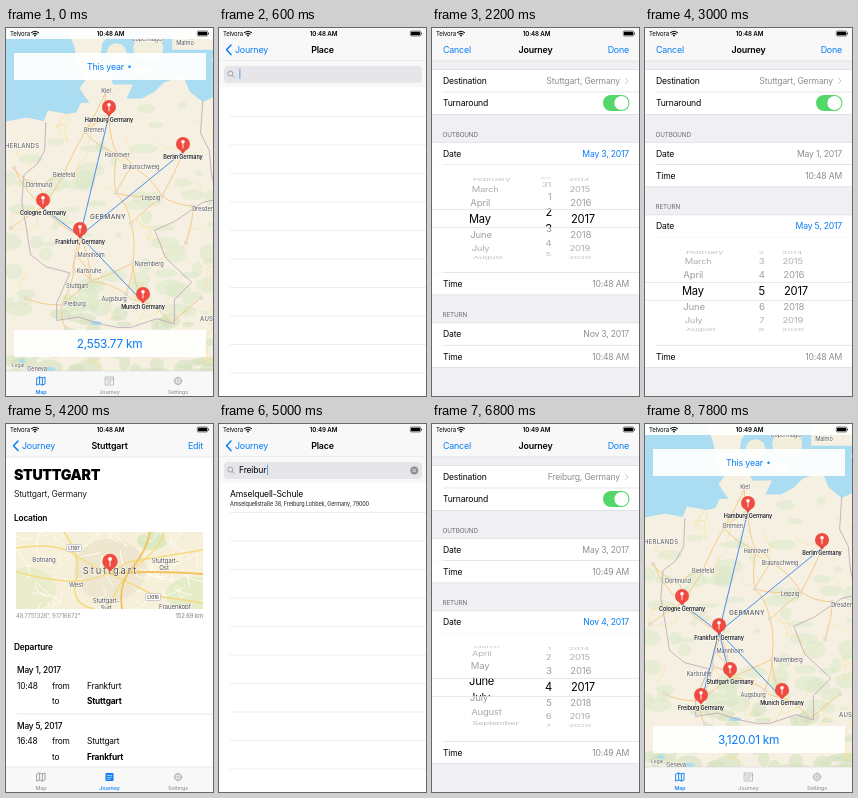
Write an HTML page that moves like this. It is 207 px wide and 368 px high and loops after 8 s.

```html
<!DOCTYPE html>
<html lang="en">
<head>
<meta charset="utf-8">
<title>Journey planner</title>
<style>
html, body { margin: 0; width: 100%; height: 100%; overflow: hidden; background: #fff; }
svg { display: block; width: 100vw; height: 100vh; }
text { font-family: Inter, Roboto, "Liberation Sans", sans-serif; letter-spacing: -.022em; white-space: pre; }
.halo text { paint-order: stroke; stroke: #fffc; stroke-width: 1.2px; stroke-linejoin: round; }
</style>
</head>
<body>
<svg id="stage" viewBox="0 0 207 368">
  <defs>
    <clipPath id="band"><rect y="45" width="207" height="18"/></clipPath>
    <clipPath id="wheel"><path d="M0 4H207V45H0ZM0 63H207V104H0Z"/></clipPath>
    <clipPath id="mini"><rect x="10" y="108" width="187" height="77"/></clipPath>
  </defs>
  <g id="map"></g>
  <g id="screen"></g>
</svg>
<script>
const BLUE = '#087cf5', GREY = '#8e8e93', LINE = '#cfced3', INK = '#000';
const MONTHS = ['January', 'February', 'March', 'April', 'May', 'June', 'July',
  'August', 'September', 'October', 'November', 'December'];
const NOV = 10, MAY = 4;

// ---- drawing helpers ----
const text = (x, y, s, size = 8.6, fill = INK, weight = 400, anchor = 'start', extra = '') =>
  `<text x="${x}" y="${y}" font-size="${size}" fill="${fill}" font-weight="${weight}" text-anchor="${anchor}" ${extra}>${s}</text>`;
const rect = (x, y, w, h, fill, r = 0) =>
  `<rect x="${x}" y="${y}" width="${w}" height="${h}" rx="${r}" fill="${fill}"/>`;
const stroke = (d, color, width = 1, extra = '') =>
  `<path d="${d}" fill="none" stroke="${color}" stroke-width="${width}" stroke-linejoin="round" stroke-linecap="round" ${extra}/>`;
const rule = (y, x = 0, color = LINE) => rect(x, y - .25, 207 - x, .5, color);
const group = (x, y, s, extra = '') => `<g transform="translate(${x} ${y})" ${extra}>${s}</g>`;

function seeded(seed) {
  return () => (seed = (seed * 16807) % 2147483647) / 2147483647;
}

function pin(x, y, scale = 1) {
  return `<g transform="translate(${x} ${y}) scale(${scale})">
    <path d="M-3.4 5.6L0 9.4L3.4 5.6Z" fill="#e8443a"/><circle r="7" fill="#ef4b40"/>
    ${stroke('M0 -1V4', '#fff', .9)}<circle cy="-2.2" r="1.8" fill="#fff"/></g>`;
}

// ---- bars ----
function statusBar(clock) {
  return text(4, 8, 'Telvora', 6) +
    stroke('M25.6 4.6Q29 1.8 32.4 4.6M27 6.1Q29 4.5 31 6.1', INK, 1.1) + '<circle cx="29" cy="7.5" r=".9"/>' +
    text(104.5, 8, clock + ' AM', 6.2, INK, 600, 'middle') +
    '<rect x="191.3" y="3" width="10.4" height="5" rx="1.2" fill="none" stroke="#000" stroke-width=".5"/>' +
    rect(192, 3.7, 9, 3.6, INK, .6) + rect(202.2, 4.6, .8, 1.8, INK, .4);
}

function navBar(clock, title, left, right, back) {
  return rect(0, 0, 207, 33, '#f8f8f8') + rule(33) + statusBar(clock) +
    (back ? stroke('M12 17L7.5 21.8L12 26.6', BLUE, 1.5) : '') +
    text(back ? 16 : 11, 25, left, 8.9, BLUE) +
    text(103.5, 25, title, 8.9, INK, 600, 'middle') +
    text(197, 25, right, 8.9, BLUE, 400, 'end');
}

function tabBar(active) {
  const color = i => i === active ? BLUE : '#999';
  const calendar = active === 1
    ? rect(-4, -4, 8, 8, BLUE, 1) + stroke('M-2.4 -1.6H2.4M-2.4 .4H2.4M-2.4 2.3H1', '#fff', .6)
    : stroke('M-4 -4H4V4H-4ZM-4 -2H4M-2.4 0H2.4M-2.4 2H1', '#999', .6);
  const icons = [
    stroke('M-4 -3L-1.4 -4L1.4 -3L4 -4V3L1.4 4L-1.4 3L-4 4ZM-1.4 -4V3M1.4 -3V4', color(0), .9),
    calendar,
    `<circle r="3.7" fill="none" stroke="#999" stroke-width="1" stroke-dasharray=".9 .55"/>` +
      `<circle r="2.9" fill="none" stroke="#999" stroke-width=".6"/><circle r="1.1" fill="none" stroke="#999" stroke-width=".6"/>`
  ];
  return rect(0, 343, 207, 25, '#f8f8f8') + rule(343) +
    ['Map', 'Journey', 'Settings'].map((name, i) => group(35 + i * 68.5, 353, icons[i]) +
      text(35 + i * 68.5, 366, name, 5.4, color(i), 500, 'middle')).join('');
}

// ---- country map ----
const geo = (lon, lat) => [103 + 21.8 * (lon - 10), 86 + 34.7 * (53.55 - lat)];
function trace(flat) {
  let d = '';
  for (let i = 0; i < flat.length; i += 2)
    d += (i ? 'L' : 'M') + geo(flat[i], flat[i + 1]).map(v => v.toFixed(1)).join(' ');
  return d;
}
const NORTH_SEA = [5, 56, 5, 53.3, 6.2, 53.45, 7, 53.35, 7.2, 53.65, 8.1, 53.55, 8.5, 53.6, 8.7, 53.87, 9.1, 53.88,
  8.85, 54.1, 8.65, 54.3, 8.9, 54.5, 8.6, 54.9, 8.4, 55.5, 8.1, 56];
const BALTIC = [10.2, 56, 9.7, 55.6, 9.6, 55.2, 9.5, 54.85, 10, 54.7, 10.2, 54.4, 11.1, 54.4, 10.8, 54, 11.5, 54,
  12.1, 54.2, 12.5, 54.45, 13.4, 54.65, 13.7, 54.2, 14.3, 53.9, 15, 54.1, 15, 55.4, 14.2, 55.4, 12.9, 55.4, 12.9, 56];
const BORDER = [7.1, 53.3, 7.05, 52.5, 6.7, 52.1, 6.1, 51.8, 6, 51, 6.2, 50.3, 6.4, 49.5, 7.1, 49.15, 8.2, 48.97,
  7.6, 48.1, 7.6, 47.6, 8.6, 47.7, 9.6, 47.5, 10.4, 47.4, 11, 47.4, 12.2, 47.65, 13, 47.5, 13, 48.2, 13.8, 48.7,
  12.6, 49.4, 12.1, 50.2, 13, 50.45, 14.3, 51, 15, 51.1, 14.7, 51.8, 14.6, 52.5, 14.2, 53, 14.3, 53.9];
const TOWNS = [[100, 63], [103, 86], [79, 104], [111, 126], [126, 138], [58, 146], [33, 158], [177, 124], [156, 168],
  [187, 178], [37, 179], [74, 208], [70, 228], [68, 243], [85, 253], [127, 235], [120, 266], [137, 273], [56, 277],
  [20, 270], [31, 342], [8, 140], [5, 200], [60, 300], [180, 215], [195, 270], [165, 295], [110, 165], [125, 195]];

function terrain() {
  const rnd = seeded(417);
  let s = rect(0, 0, 207, 368, '#f5f0e2');
  for (let i = 0; i < 130; i++) {
    const y = 60 + 300 * Math.sqrt(rnd());
    s += `<ellipse cx="${rnd() * 207}" cy="${y}" rx="${3 + rnd() * 12}" ry="${2 + rnd() * 7}" fill="${y > 285 ? '#cfe0b7' : '#d9e8c6'}" opacity=".5"/>`;
  }
  const join = (pts, reach, color, width) => {
    let d = '';
    pts.forEach(([x, y], i) => pts.slice(i + 1).forEach(([u, v], k) => {
      if (Math.hypot(x - u, y - v) > reach) return;
      const bend = (i + k) % 2 ? 4 : -4;
      d += `M${x} ${y}Q${(x + u) / 2 + bend} ${(y + v) / 2 - bend} ${u} ${v}`;
    }));
    return stroke(d, color, width);
  };
  const villages = Array.from({ length: 110 }, () => [Math.round(rnd() * 215 - 4), Math.round(50 + rnd() * 300)]);
  s += join(villages, 21, '#f8e3a5', .6) + join(TOWNS, 49, '#f5c87c', .9);
  s += TOWNS.map(([x, y]) => `<circle cx="${x}" cy="${y}" r="2.2" fill="#e6dccb"/>`).join('');
  s += `<path d="${trace(NORTH_SEA)}Z${trace(BALTIC)}Z" fill="#aadcf2"/>`;
  for (const [lon, lat, rx, ry] of [[10.35, 55.3, 10, 10], [11.8, 55.45, 15, 13], [11.5, 54.8, 9, 4], [14.9, 55.1, 4, 3]]) {
    const [x, y] = geo(lon, lat);
    s += `<ellipse cx="${x}" cy="${y}" rx="${rx}" ry="${ry}" fill="#f1efdc"/>`;
  }
  for (const [x, y, w] of [[90, 295, 6], [43, 341, 7], [16, 333, 3]])
    s += `<ellipse cx="${x}" cy="${y}" rx="${w}" ry="2" fill="#aadcf2"/>`;
  return s + stroke(trace(BORDER), '#b9a5b4', .8);
}

const LABELS = [['Copenhagen', 142, 13], ['Malmö', 179, 17], ['Kiel', 100, 65], ['Bremen', 88, 104],
  ['Hannover', 111, 129], ['Braunschweig', 135, 141], ['Bielefeld', 58, 149], ['Dortmund', 33, 159],
  ['Leipzig', 145, 172], ['Dresden', 197, 183], ['Mannheim', 85, 229], ['Nuremberg', 143, 238],
  ['Augsburg', 108, 273], ['Geneva', 31, 343]];
const STOPS = [['Hamburg', 103, 79], ['Berlin', 177, 116], ['Cologne', 37, 172], ['Munich', 137, 266],
  ['Stuttgart', 85, 245], ['Freiburg', 56, 271]];

function mapScreen(clock, full) {
  const stops = full ? STOPS : STOPS.slice(0, 4);
  const names = LABELS.concat(full ? [['Karlsruhe', 54, 252]]
    : [['Karlsruhe', 83, 245], ['Stuttgart', 71, 260], ['Freiburg', 69, 278]]);
  const caption = (name, x, y) => text(x, y + 14.5, name, 5.5, '#222', 600, 'middle');
  return '<g class="halo">' +
    names.map(([n, x, y]) => text(x, y, n, 5.7, '#555', 400, 'middle')).join('') +
    text(102, 190.5, 'GERMANY', 6.6, '#555', 500, 'middle', 'style="letter-spacing:.06em"') +
    text(-1, 120, 'HERLANDS', 6, '#666', 500, 'start', 'style="letter-spacing:.04em"') +
    text(194, 293, 'AUSTRIA', 6, '#666', 500, 'start', 'style="letter-spacing:.04em"') +
    text(6, 339, 'Legal', 5, '#666') + '</g>' +
    stroke(stops.map(([, x, y]) => `M74 208L${x} ${y + 8}`).join(''), '#4a8fe8', 1) +
    stops.map(([, x, y]) => pin(x, y)).join('') + pin(74, 201) +
    '<g class="halo">' + stops.map(([n, x, y]) => caption(n + ' Germany', x, y)).join('') +
    caption('Frankfurt, Germany', 74, 201) + '</g>' +
    rect(0, 0, 207, 11, '#fffffff0') + statusBar(clock) +
    rect(8, 25, 192, 27, '#fffffff0') + text(99.5, 41.5, 'This year', 8.9, BLUE, 400, 'middle') +
    `<circle cx="123.5" cy="38.8" r="1.2" fill="${BLUE}"/>` +
    rect(8, 302, 192, 27, '#fffffff0') +
    text(103.5, 320, full ? '3,120.01 km' : '2,553.77 km', 11.8, BLUE, 400, 'middle') + tabBar(0);
}

// ---- wheel picker ----
function picker(cols, top) {
  let wheel = '', band = '';
  for (const { x, v, item, anchor = 'start' } of cols) {
    for (let k = -4; k <= 4; k++) {
      const i = Math.round(v) + k, d = i - v, a = d * .39;
      if (Math.abs(d) > 3.4) continue;
      const c = Math.cos(a), near = 1 - .02 * Math.abs(d);
      wheel += `<g transform="translate(${103 + (x - 103) * near} ${54 + 42 * Math.sin(a)}) scale(${near} ${c})" opacity="${.25 + .5 * c}">` +
        text(0, 3.5, item(i), 9.8, '#777', 400, anchor) + '</g>';
      if (Math.abs(d) < 1.5) band += text(x, 58 + d * 17, item(i), 11.2, INK, 400, anchor);
    }
  }
  return group(0, top, rect(0, 0, 207, 108, '#fff') + `<g clip-path="url(#wheel)">${wheel}</g>` +
    `<g clip-path="url(#band)">${band}</g>` + rule(45) + rule(63));
}
const wrap = (i, n) => ((i % n) + n) % n;
const dateWheel = (month, day) => [
  { x: 37, v: month, item: i => MONTHS[wrap(i, 12)] },
  { x: 120, v: day, item: i => wrap(i - 1, 31) + 1, anchor: 'end' },
  { x: 139, v: 2017, item: i => i }
];
const timeWheel = (hour, minute, half) => [
  { x: 80, v: hour, item: i => wrap(i - 1, 12) + 1, anchor: 'end' },
  { x: 112, v: minute, item: i => String(wrap(i, 60)).padStart(2, '0'), anchor: 'end' },
  { x: 134, v: half, item: i => ['AM', 'PM'][i] || '' }
];

// ---- screens ----
function form(clock, { dest = '', out = 'Nov 3, 2017', ret = 'Nov 3, 2017', back = clock + ' AM', open, wheel, press }) {
  const H = 22.3;
  let y = 41.7, s = rect(0, 0, 207, 368, '#efeff4');
  const row = (label, value, key, right = 197) => {
    s += rect(0, y, 207, H, press && press === key ? '#d3d3d5' : '#fff') + text(11, y + 14.4, label) +
      text(right, y + 14.4, value, 8.6, open && open === key ? BLUE : GREY, 400, 'end');
    y += H;
    if (open && open === key) { s += rule(y, 11) + picker(wheel, y); y += 108; }
  };
  const pair = (first, second) => {
    const top = y;
    row(...first);
    const mid = y;
    row(...second);
    s += rule(top) + rule(mid, 11) + rule(y);
    y += 28;
  };
  const header = name => { s += text(10.5, y - 5.8, name, 6.3, '#6d6d72'); };
  pair(['Destination', dest, 'dest', 188], ['Turnaround', '']);
  s += stroke('M193.5 50.2L196 52.9L193.5 55.6', '#c7c7cc', 1) +
    rect(171, 67, 26.5, 16, '#53d769', 8) + '<circle cx="189.4" cy="75" r="7.1" fill="#fff"/>';
  header('OUTBOUND');
  pair(['Date', out, 'outDate'], ['Time', clock + ' AM', 'outTime']);
  header('RETURN');
  pair(['Date', ret, 'retDate'], ['Time', back, 'retTime']);
  return s + navBar(clock, 'Journey', 'Cancel', 'Done');
}

function list(clock, names) {
  return rect(0, 0, 207, 368, '#fff') + navBar(clock, 'Journey', '', '') +
    stroke('M187.5 21.8H196.5M192 17.3V26.3', BLUE, 1.1) +
    names.map((name, i) => {
      const y = 33 + i * 28.5;
      return text(11, y + 13, name) + text(11, y + 22, name + ', Germany', 5.8, GREY) +
        stroke(`M193.5 ${y + 11.5}L196 ${y + 14.2}L193.5 ${y + 17}`, '#c7c7cc') + rule(y + 28.5, 11);
    }).join('') + tabBar(1);
}

function search(clock, query, title, detail) {
  let s = rect(0, 0, 207, 368, '#fff') + navBar(clock, 'Place', 'Journey', '', true) +
    rect(0, 33, 207, 26, '#f8f8f8') + rect(5, 38, 198, 17, '#e6e6ea', 4) +
    '<circle cx="11.3" cy="45.6" r="2.5" fill="none" stroke="#8e8e93" stroke-width=".8"/>' +
    stroke('M13.2 47.5L15.2 49.5', GREY, .8) +
    `<text x="20" y="49.4" font-size="8.6">${query}<tspan fill="${BLUE}" dx="-.4">|</tspan></text>`;
  if (query) s += `<circle cx="195.3" cy="46.4" r="4" fill="${GREY}"/>` + stroke('M193.8 44.9L196.8 47.9M196.8 44.9L193.8 47.9', '#fff', .8);
  for (let i = 0; i < 10; i++) s += rule(88.5 + i * 28.5, 11, '#dcdce0');
  if (title) s += text(11, 73, title) + text(11, 81.6, detail, 5.5, '#222');
  return s;
}

function cityMap() {
  const rnd = seeded(93);
  let streets = '';
  for (let i = 0; i < 60; i++) {
    const x = 10 + rnd() * 187, y = 108 + rnd() * 77;
    streets += `M${x} ${y}q${rnd() * 16 - 8} ${rnd() * 14} ${rnd() * 50 - 25} ${rnd() * 36 - 18}`;
  }
  const place = (n, x, y) => text(x, y, n, 6.2, '#555', 400, 'middle');
  const sign = (n, x, y) => rect(x - 8, y - 4, 16, 8, '#fff', 1.5) +
    `<rect x="${x - 7.5}" y="${y - 3.5}" width="15" height="7" rx="1" fill="none" stroke="#999" stroke-width=".5"/>` +
    text(x, y + 1.8, n, 4.6, '#555', 600, 'middle');
  return '<g clip-path="url(#mini)">' + rect(10, 108, 187, 77, '#f6f0da') +
    '<ellipse cx="22" cy="165" rx="28" ry="22" fill="#e9edcb"/><ellipse cx="186" cy="170" rx="26" ry="17" fill="#e4ecc8"/>' +
    '<ellipse cx="104" cy="146" rx="36" ry="31" fill="#efe6cf"/><ellipse cx="146" cy="117" rx="15" ry="9" fill="#dce9c2"/>' +
    stroke(streets, '#fffdf3', .9) +
    stroke('M10 124Q50 118 68 130T104 150T150 172L197 179M58 108Q76 132 70 156T88 185M104 185Q110 158 133 140T158 108M10 148Q48 158 72 157T122 138L197 126', '#f6da7e', 1.5) +
    stroke('M116 185Q112 160 126 144T144 108M104 150Q140 146 197 150', '#f3c25d', 1.8) +
    '<g class="halo">' + place('Botnang', 38, 138) + place('West', 70, 163) + place('Stuttgart-', 100, 178.5) +
    place('Süd', 100, 186) + place('Stuttgart-', 159, 138.5) + place('Ost', 158, 146) + place('Frauenkopf', 169, 184.5) +
    text(104.5, 150, 'Stuttgart', 9.4, '#555', 400, 'middle', 'style="letter-spacing:.2em"') + '</g>' +
    sign('L1187', 68, 124) + sign('L1016', 147, 173) + pin(104, 137.5, 1.1) + '</g>';
}

function detail(clock) {
  const trip = (y, day, time, from, to) => text(11, y, day, 8.3, INK, 500) +
    text(11, y + 15.5, time, 8.3) + text(46, y + 15.5, 'from', 8.3) + text(81, y + 15.5, from, 8.3) +
    text(46, y + 31, 'to', 8.3) + text(81, y + 31, to, 8.3, INK, 700);
  return rect(0, 0, 207, 368, '#fff') + navBar(clock, 'Stuttgart', 'Journey', 'Edit', true) +
    text(8, 55.5, 'STUTTGART', 14.2, INK, 900) + text(8, 73, 'Stuttgart, Germany', 8.5, '#222') +
    text(8, 96.5, 'Location', 8.3, INK, 600) + cityMap() +
    text(10, 194, '48.7751328°, 9.1716672°', 5.9, GREY) + text(197, 194, '152.69 km', 5.9, GREY, 500, 'end') +
    text(8, 226, 'Departure', 8.3, INK, 600) +
    trip(249, 'May 1, 2017', '10:48', 'Frankfurt', 'Stuttgart') + rule(290, 11) +
    trip(304.5, 'May 5, 2017', '16:48', 'Stuttgart', 'Frankfurt') + tabBar(1);
}

// ---- timeline, one entry per 200 ms ----
const A = '10:48', B = '10:49';
const HOME = ['Hamburg', 'Berlin', 'Cologne', 'Munich'];
const first = o => () => form(A, { dest: 'Stuttgart, Germany', ...o });
const second = o => () => form(B, { dest: 'Freiburg, Germany', ...o });
const outWheel = (m, d, out) => ({ open: 'outDate', wheel: dateWheel(m, d), out });
const retWheel = (m, d, out, ret) => ({ open: 'retDate', wheel: dateWheel(m, d), out, ret });
const ONE = 'May 1, 2017', THREE = 'May 3, 2017', FIVE = 'May 5, 2017';
const hours = (h, m, p, back) => ({ out: ONE, ret: FIVE, back, open: 'retTime', wheel: timeWheel(h, m, p) });

const STEPS = [
  () => mapScreen(A, false),
  () => list(A, HOME),
  () => form(A, {}),
  () => search(A, ''),
  () => search(A, 'Stu'),
  () => search(A, 'Stuttgar', 'Stuttgart', 'Stuttgart, Germany'),
  first({}),
  first({ press: 'outDate' }),
  first(outWheel(NOV, 3)),
  first(outWheel(7.6, 3)),
  first(outWheel(4.7, 3)),
  first(outWheel(MAY, 2.4, THREE)),
  first(outWheel(MAY, 1, ONE)),
  first(retWheel(NOV, 3, ONE)),
  first(retWheel(6.3, 3, ONE)),
  first(retWheel(MAY, 5, ONE, FIVE)),
  first(hours(10, 48, 0, '10:48 AM')),
  first(hours(6.6, 48, .6, '10:48 AM')),
  first(hours(4, 48, 1, '4:48 PM')),
  first({ out: ONE, ret: FIVE, back: '4:48 PM' }),
  () => list(A, [...HOME, 'Stuttgart']),
  () => detail(A),
  () => list(A, [...HOME, 'Stuttgart']),
  () => form(A, {}),
  () => search(B, ''),
  () => search(B, 'Freibur', 'Amselquell-Schule', 'Amselquellstraße 38, Freiburg Lohbek, Germany, 79000'),
  second({}),
  second(outWheel(NOV, 3)),
  second(outWheel(7.4, 3)),
  second(outWheel(4.8, 3)),
  second(outWheel(MAY, 3, THREE)),
  second(outWheel(MAY, 3, THREE)),
  second(retWheel(NOV, 3, THREE)),
  second(retWheel(NOV, 4, THREE, 'Nov 4, 2017')),
  second(retWheel(5.34, 4, THREE, 'Nov 4, 2017')),
  second(retWheel(MAY, 4, THREE, 'May 4, 2017')),
  second({ out: THREE, ret: 'May 4, 2017' }),
  () => list(B, [...HOME, 'Stuttgart', 'Freiburg']),
  () => mapScreen(B, false),
  () => mapScreen(B, true)
];

const screenLayer = document.getElementById('screen');
document.getElementById('map').innerHTML = terrain();
let shown = -1;
function tick() {
  const step = Math.floor(performance.now() % 8000 / 200);
  if (step !== shown) screenLayer.innerHTML = STEPS[shown = step]();
  requestAnimationFrame(tick);
}
tick();
</script>
</body>
</html>
```
